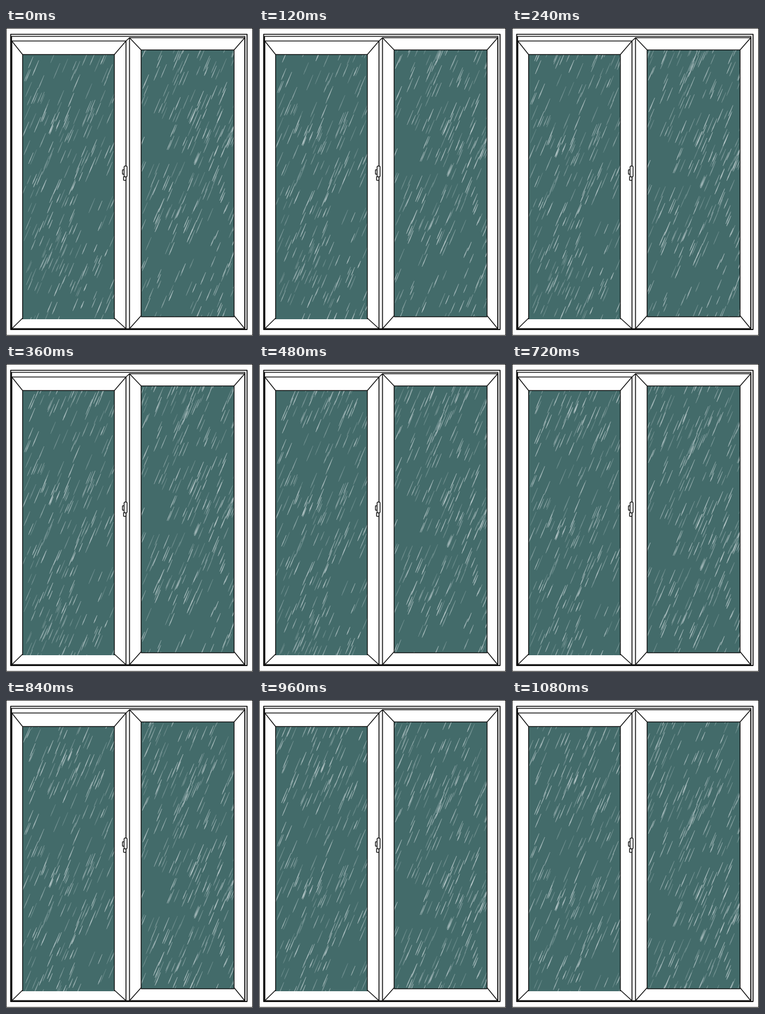
Recreate the animation shown at these times as an HTML page with a canvas. Size 457x569 px, loop 1.2 s.

```html
<!DOCTYPE html>
<html lang="en">
<head>
<meta charset="utf-8">
<title>Rain on a window</title>
<style>
html, body { margin: 0; width: 100%; height: 100%; overflow: hidden; background: #fff; }
canvas { display: block; width: 457px; height: 569px; }
</style>
</head>
<body>
<canvas id="stage" width="457" height="569"></canvas>
<script>
const ctx = document.getElementById('stage').getContext('2d');
const W = 457, H = 569;
const LOOP = 1200, STEP = 120, FALL = 21.5;
const TOP = -FALL * LOOP / STEP;
const GLASS = '#436b6a', RAIN = '#d3dee0', INK = '#111';

// Each sash has a frame, a glass area, and centres of thick and thin rain
const sashes = [
  {
    left: 10.7, top: 24, right: 222, bottom: 555.5,
    glass: { left: 30.7, top: 49, right: 200.5, bottom: 538 }, sill: false, seed: 11,
    thick: [[130, -15], [122, 190], [100, 430]],
    thin: [[165, 340], [95, 100], [45, 505]]
  },
  {
    left: 228.5, top: 18, right: 441.7, bottom: 555.5,
    glass: { left: 250, top: 40.5, right: 422, bottom: 533.5 }, sill: true, seed: 29,
    thick: [[340, 0], [392, 205], [342, 320]],
    thin: [[280, 400], [345, 415], [282, 215]]
  }
];

function randomizer(seed) {
  return () => {
    seed = (seed + 0x6d2b79f5) | 0;
    let v = Math.imul(seed ^ (seed >>> 15), 1 | seed);
    v = (v + Math.imul(v ^ (v >>> 7), 61 | v)) ^ v;
    return ((v ^ (v >>> 14)) >>> 0) / 4294967296;
  };
}

const near = (x, y, points) => points.reduce((sum, [px, py]) =>
  sum + Math.exp(-(((x - px) / 34) ** 2) - ((y - py) / 38) ** 2), 0);

// Scatter drops over the sheet, keeping more of them in the thick parts
function makeDrops({ glass, seed, thick, thin }) {
  const rnd = randomizer(seed);
  const drops = [];
  for (let i = 0; i < 1000; i++) {
    const x = glass.left + rnd() * (glass.right - glass.left + 4);
    const y = TOP + rnd() * (H - TOP);
    const density = 0.38 + 0.5 * near(x, y, thick) - 0.32 * near(x, y, thin);
    const len = (y > 400 ? 13 : 16) + rnd() * 13;
    const alpha = 0.2 + 0.55 * rnd() ** 1.4;
    const width = 0.9 + rnd() * 0.7;
    if (rnd() < density) drops.push({ x, y, len, alpha, width });
  }
  return drops;
}

for (const sash of sashes) sash.drops = makeDrops(sash);

// Slim streak, thickest in its lower half
function drawDrop({ x, y, len, alpha, width }) {
  const dy = len / 2, dx = dy * 0.42;
  ctx.globalAlpha = alpha;
  ctx.beginPath();
  ctx.moveTo(x + dx, y - dy);
  ctx.lineTo(x - dx * 0.4 + width / 2, y + dy * 0.4);
  ctx.lineTo(x - dx, y + dy);
  ctx.lineTo(x - dx * 0.4 - width / 2, y + dy * 0.4);
  ctx.closePath();
  ctx.fill();
  ctx.stroke();
}

function drawGlass({ glass, drops }, shift) {
  const { left, top, right, bottom } = glass;
  ctx.save();
  ctx.beginPath();
  ctx.rect(left, top, right - left, bottom - top);
  ctx.fillStyle = GLASS;
  ctx.fill();
  ctx.clip();
  ctx.translate(0, shift);
  ctx.fillStyle = ctx.strokeStyle = RAIN;
  ctx.lineWidth = 0.5;
  drops.forEach(drawDrop);
  ctx.restore();
}

function line(width, ...points) {
  ctx.lineWidth = width;
  ctx.beginPath();
  for (const [x, y] of points) ctx.lineTo(x, y);
  ctx.stroke();
}

function box(width, left, top, right, bottom) {
  ctx.lineWidth = width;
  ctx.strokeRect(left, top, right - left, bottom - top);
}

function drawSash({ left, top, right, bottom, glass: g, sill }) {
  box(1.7, left, top, right, bottom);
  line(1.5, [g.left, g.bottom], [g.left, g.top], [g.right, g.top], [g.right, g.bottom]);
  if (sill) line(1.5, [g.left, g.bottom], [g.right, g.bottom]);
  // mitred corners
  for (const x of ['left', 'right']) {
    line(1.6, [{ left, right }[x], top], [g[x], g.top]);
    line(1.6, [{ left, right }[x], bottom], [g[x], g.bottom - 2]);
  }
}

function drawHandle() {
  ctx.fillStyle = '#fff';
  ctx.lineWidth = 1.5;
  const part = (x, y, w, h, r) => {
    ctx.beginPath();
    ctx.roundRect(x, y, w, h, r);
    ctx.fill();
    ctx.stroke();
  };
  part(215.5, 262, 4, 8, 0.5);
  part(217.5, 274.5, 4.5, 7, 1);
  part(218.5, 255, 5.5, 20, 2);
}

function drawFrame() {
  ctx.strokeStyle = INK;
  ctx.lineJoin = 'round';
  box(1.2, 0.4, 0.4, W - 0.6, H - 1.2);
  box(1.8, 8.6, 11.6, 446, 557);
  line(1.5, [9, 15.5], [442, 15.5], [442, 556]);
  line(2.4, [10, 15.5], [10, 556], [442, 556]);
  line(1.6, [222, 24], [228.5, 18]);
  sashes.forEach(drawSash);
  drawHandle();
}

const start = performance.now();

function render(now) {
  const step = Math.floor((Math.max(0, now - start) % LOOP) / STEP);
  ctx.fillStyle = '#fff';
  ctx.fillRect(0, 0, W, H);
  for (const sash of sashes) drawGlass(sash, step * FALL);
  drawFrame();
  requestAnimationFrame(render);
}
render(start);
</script>
</body>
</html>
```
